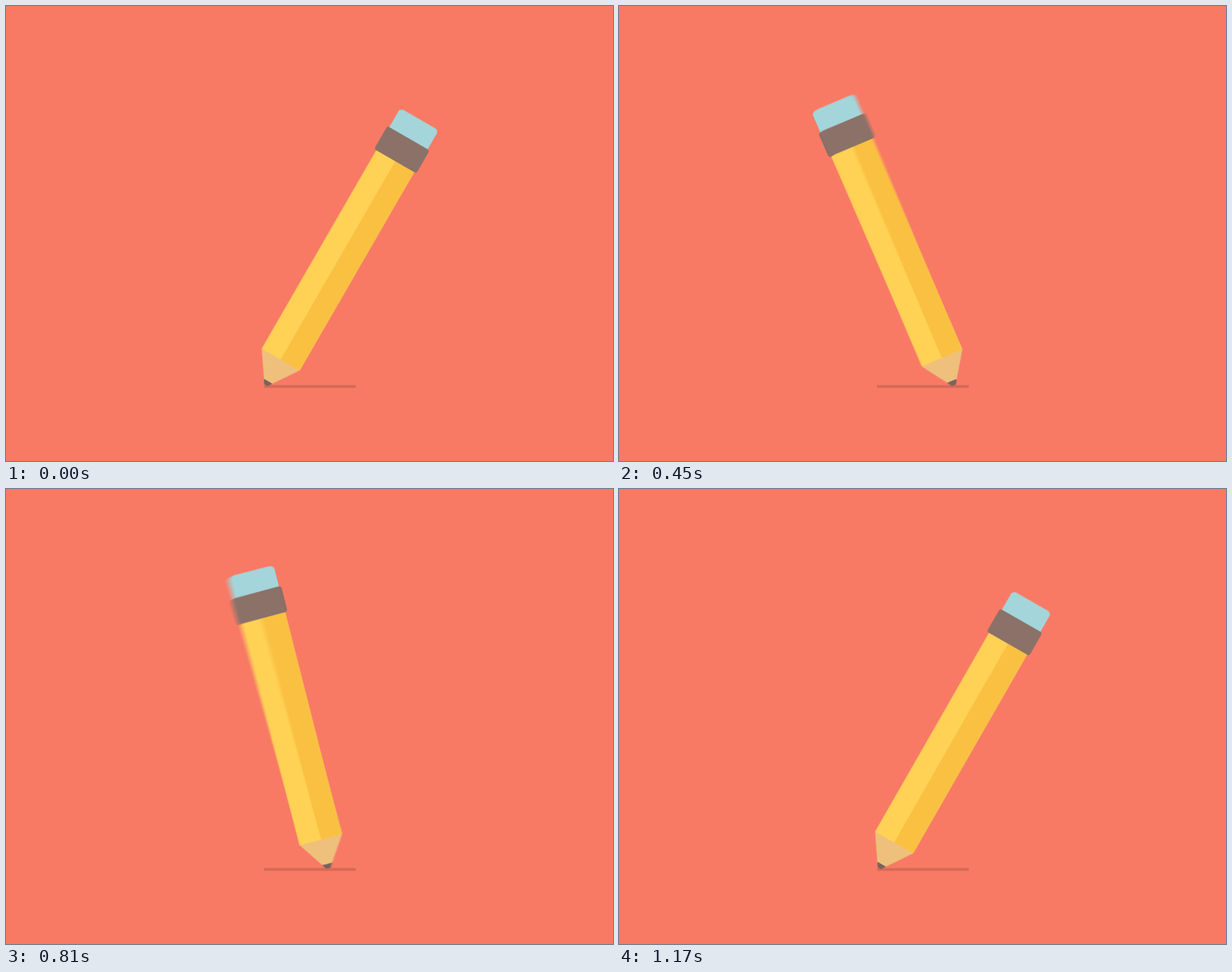
Recreate the animation shown at these times as an HTML page without scripts. Size 800 by 600 pixels, loop 1200 ms.

```html
<!DOCTYPE html>
<html lang="en">
<head>
<meta charset="utf-8">
<title>Swinging pencil</title>
<style>
  html, body { margin: 0; width: 100%; height: 100%; overflow: hidden; background: #f87a65; }
  svg { display: block; width: 100%; height: 100%; }

  .slide, .swing {
    animation: slide 600ms cubic-bezier(.333, 0, .667, 1) infinite alternate;
    animation-delay: calc(var(--lag) - 1200ms);
  }
  .swing {
    animation-name: swing;
    animation-timing-function: cubic-bezier(.45, 0, .55, 1);
  }
  @keyframes slide {
    from { transform: translate(342.5px, 500px); }
    to   { transform: translate(458.5px, 500px); }
  }
  @keyframes swing {
    from { transform: rotate(30deg); }
    to   { transform: rotate(-30deg); }
  }
</style>
</head>
<body>
<svg viewBox="0 0 800 600">
  <defs>
    <!-- Upright pencil with its tip at the origin -->
    <g id="pencil">
      <rect x="-29" y="-404.5" width="58" height="40" rx="5" fill="#a3d5db"/>
      <path d="M-28.5-345H28.5V-39H-28.5z" fill="#ffd053"/>
      <path d="M0-345H28.5V-39H0z" fill="#f9c040"/>
      <rect x="-32" y="-376" width="64" height="35" rx="4" fill="#8b6e65"/>
      <path d="M-28.5-39H28.5L6-6H-6z" fill="#efc079"/>
      <path d="M-6-6H6L3.3-1.6Q2.3 0 .8 0H-.8Q-2.3 0-3.3-1.6z" fill="#77615a"/>
    </g>
  </defs>

  <rect x="340" y="499.7" width="121" height="3.7" rx="1" fill="#d66a57"/>

  <!-- Motion blur: copies close in time, the nth at opacity 1/n so all weigh the same -->
  <g class="slide" style="--lag: -6ms"><use class="swing" href="#pencil"/></g>
  <g class="slide" style="--lag: -4ms" opacity=".5"><use class="swing" href="#pencil"/></g>
  <g class="slide" style="--lag: -2ms" opacity=".3333"><use class="swing" href="#pencil"/></g>
  <g class="slide" style="--lag: 0ms" opacity=".25"><use class="swing" href="#pencil"/></g>
  <g class="slide" style="--lag: 2ms" opacity=".2"><use class="swing" href="#pencil"/></g>
  <g class="slide" style="--lag: 4ms" opacity=".1667"><use class="swing" href="#pencil"/></g>
  <g class="slide" style="--lag: 6ms" opacity=".1429"><use class="swing" href="#pencil"/></g>
</svg>
</body>
</html>
```
